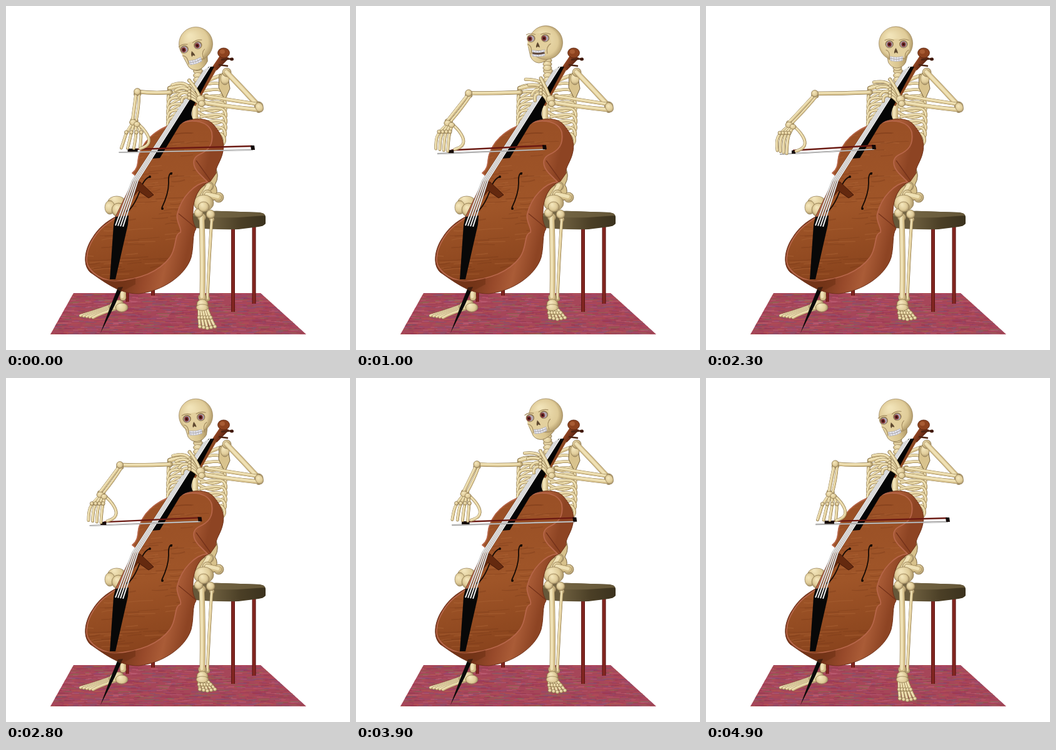
Animation of 550x550 px, one loop 5 s. Source, as an HTML page with a canvas:

```html
<!DOCTYPE html>
<html lang="en">
<head>
<meta charset="utf-8">
<title>Skeleton cellist</title>
<style>
html, body { margin: 0; height: 100%; overflow: hidden; background: #fff; }
canvas { display: block; width: 550px; height: 550px; }
</style>
</head>
<body>
<canvas id="stage" width="550" height="550"></canvas>
<script>
const stage = document.getElementById('stage').getContext('2d');
const backdrop = document.createElement('canvas');
backdrop.width = backdrop.height = 550;
let g = backdrop.getContext('2d');

let seed = 7;
const rnd = () => (seed = seed * 16807 % 2147483647) / 2147483647;
const lerp = (a, b, k) => a + (b - a) * k;

function shape(d, fill, line, w = 1) {
  const p = new Path2D(d);
  if (fill) { g.fillStyle = fill; g.fill(p); }
  if (line) { g.strokeStyle = line; g.lineWidth = w; g.stroke(p); }
  return p;
}
function oval(x, y, rx, ry, fill, line, turn = 0) {
  g.beginPath();
  g.ellipse(x, y, rx, ry, turn, 0, 7);
  g.fillStyle = fill;
  g.fill();
  if (line) { g.strokeStyle = line; g.lineWidth = .7; g.stroke(); }
}
function fade(x0, y0, x1, y1, ...cols) {
  const f = g.createLinearGradient(x0, y0, x1, y1);
  cols.forEach((c, i) => f.addColorStop(i / (cols.length - 1), c));
  return f;
}
function knob(x, y, r, ry = r, turn = 0) {
  const f = g.createRadialGradient(x - r * .3, y - r * .4, r * .1, x, y, Math.max(r, ry) * 1.1);
  f.addColorStop(0, '#f3e5bb');
  f.addColorStop(.6, '#dfcb98');
  f.addColorStop(1, '#98825a');
  oval(x, y, r, ry, f, '#8d774e', turn);
}
// Rounded bone through [x, y, x, y, ...], optionally with swollen ends
function bone(p, w, ends = 0) {
  const n = p.length;
  if (ends) { knob(p[0], p[1], ends); knob(p[n - 2], p[n - 1], ends); }
  g.lineCap = g.lineJoin = 'round';
  for (const [col, width, off] of [['#7c6740', w + .8, 0], ['#d6c08b', w, 0], ['#efe1b5', w * .55, -w * .14]]) {
    g.beginPath();
    g.moveTo(p[0] + off, p[1] + off);
    for (let i = 2; i < n - 2; i += 2) {
      const last = i === n - 4;
      const ex = last ? p[i + 2] : (p[i] + p[i + 2]) / 2;
      const ey = last ? p[i + 3] : (p[i + 1] + p[i + 3]) / 2;
      g.quadraticCurveTo(p[i] + off, p[i + 1] + off, ex + off, ey + off);
    }
    if (n === 4) g.lineTo(p[2] + off, p[3] + off);
    g.strokeStyle = col;
    g.lineWidth = width;
    g.stroke();
  }
  g.lineCap = 'butt';
}

function rug() {
  g.save();
  g.clip(shape('M108 459H407L480 525H71Z', '#a64659'));
  const dyes = ['#bb4c5c', '#8f3450', '#94467c', '#b55b48', '#76587c', '#c2657c', '#84704e', '#9c3450', '#a8485a'];
  for (let i = 0; i < 1500; i++) {
    const x = 55 + rnd() * 425, y = 459 + rnd() * 66;
    g.fillStyle = dyes[i % dyes.length];
    g.globalAlpha = .6;
    g.fillRect(x, y, 4 + rnd() * 18, .8 + rnd() * .6);
  }
  g.restore();
}

function chair() {
  const leg = (x, y0, y1, w = 6) => {
    g.fillStyle = fade(x - w / 2, 0, x + w / 2, 0, '#5d1713', '#8f2b25', '#5a1411');
    g.fillRect(x - w / 2, y0, w, y1 - y0);
  };
  leg(235, 430, 463);
  leg(194, 455, 473, 5);
  leg(396.5, 352, 476);
  leg(363, 354, 489);
  shape('M294 333Q315 327 345 328L405 330Q415 332 415 337V348Q412 352 404 353L372 357Q330 358 294 354Z',
    fade(294, 0, 415, 0, '#655739', '#6a5c3d', '#4b3f26', '#3b321e'));
  shape('M294 333Q315 327 345 328L405 330Q414 331 414 335L371 338Q330 339 294 336Z', fade(294, 328, 400, 340, '#796b49', '#665839'));
}

function torso() {
  for (let y = 104; y < 130; y += 7) knob(307, y, 7.5, 4.5);
  for (let y = 200; y < 320; y += 9) knob(322, y, 8, 5);
  for (let i = 0; i < 9; i++) {
    const y = 126 + i * 10, out = 346 + Math.sin(i / 3) * 4;
    bone([312, y + 1, out - 6, y - 6, out + 4, y + 8, out - 4, y + 20, 322, y + 24, 304, y + 12], 4);
    bone([290, y + 2, 265, y - 2, 257 - i * .3, y + 14, 262, y + 25], 4);
    bone([288, y + 10, 276, y + 12, 265, y + 20], 3);
  }
  bone([303, 128, 302, 180], 9);
  bone([262, 132, 280, 125, 304, 130], 6, 4);
  bone([310, 126, 330, 115, 352, 108], 5);
  shape('M341 110L354 108L358 132L350 150L340 130Z', '#d9c38d', '#75603b');
  knob(350, 116, 7, 10);
  // pelvis and knee
  shape('M333 256Q343 270 334 286Q341 295 333 310L302 320Q300 298 318 286Z', '#d7c18b', '#75603b');
  bone([325, 288, 312, 310], 10, 7);
  bone([322, 302, 340, 306], 9, 8);
  bone([329, 341, 325, 400, 322, 468], 4, 4);
  bone([313, 338, 315, 400, 314, 466], 8, 6.5);
  knob(316, 315, 16, 13);
  knob(308, 331, 7, 7);
  knob(327, 333, 7, 7);
  knob(316, 321, 9, 8);
  knob(314, 477, 9, 8);
  // far knee and foot
  knob(177, 313, 14, 9);
  knob(166, 322, 8, 11);
  knob(180, 326, 11, 11);
  bone([187, 440, 187, 466], 9, 5);
  for (let i = 0; i < 5; i++) bone([176, 476 + i * 2, 150, 486 + i * 1.4, 119 + i * 5, 495 + i * .8], 4);
  knob(176, 478, 12, 7, -.4);
  knob(185, 482, 10, 7);
}

function upperArm() {
  bone([353, 106, 378, 132, 404, 160], 8, 7);
  bone([403, 157, 362, 151, 320, 144], 5, 4);
  bone([404, 166, 360, 162, 315, 154], 6, 4.5);
  knob(405, 162, 6, 8, -.5);
}

function cello() {
  // scroll, pegs and neck
  shape('M328 100L343 78L357 83L337 103Z', fade(332, 85, 348, 95, '#a5522a', '#5a2310'));
  shape('M344 86L363 84M340 94L355 96', null, '#4c2412', 2.6);
  oval(348, 75, 9.5, 8, '#8c421e', '#51200d');
  oval(346, 73, 4, 3.5, '#a85c33');
  oval(361, 85, 3, 2.5, '#40180a');
  shape('M331 99L337 101L303 160L297 158Z', '#8d4822');
  // body
  shape('M278 187C300 178 322 178 332 190C344 204 350 217 347 232C344 249 334 258 336 267L327 280C308 288 299 308 299 330C297 343 301 350 304 356C297 366 301 382 296 402C287 431 250 456 212 460C181 461 153 438 135 426C121 413 127 387 138 371C148 354 162 344 175 337L203 280L208 272L202 267C214 258 209 245 214 235C222 210 250 190 278 187Z',
    fade(215, 330, 300, 350, '#7a3a1d', '#97492a', '#aa5c37', '#8d4423'), '#6d2f18');
  g.save();
  const face = shape('M278 188C300 179 324 185 329 202C332 222 324 231 308 238C297 244 298 256 308 267L322 281C302 283 280 306 274 332C270 342 282 356 279 362C268 365 274 386 262 402C240 431 202 438 174 440C146 438 127 419 129 403C130 381 147 358 162 348L176 338L203 282L208 272L202 267C214 258 209 245 214 235C222 210 250 190 278 188Z',
    fade(190, 220, 230, 430, '#9a5026', '#9f5528', '#8a441d'));
  g.clip(face);
  for (let i = 0; i < 170; i++) {
    const x = 115 + rnd() * 195, y = 182 + rnd() * 260, len = 15 + rnd() * 35;
    shape(`M${x} ${y}q${len / 2} ${-5 + rnd() * 8} ${len} ${-3 + rnd() * 2}`, null, i % 3 ? '#6f321444' : '#b56e3c55', 1 + rnd());
  }
  g.restore();
  g.strokeStyle = '#b7664a';
  g.lineWidth = 1.8;
  g.stroke(face);
  shape('M327 279L304 247M304 355L276 332', null, '#74321a', 1.3);
  // sound holes
  shape('M266 267Q259 266 260 283Q260 300 249 323', null, '#160b05', 1.8);
  shape('M231 273Q222 274 215 292Q207 318 193 330', null, '#160b05', 1.8);
  for (const [x, y] of [[264, 268], [250, 324], [230, 273], [194, 328]]) oval(x, y, 2, 2, '#160b05');
  // fingerboard, bridge, tailpiece and spike
  shape('M324 97L333 97L301 158Q293 172 299 181Q286 182 278 190L246 243L233 244L266 189Z', '#050505');
  shape('M208 282L214 281L236 302L228 307L211 295L202 307L198 303Z', '#64290f', '#3f1709');
  shape('M175 337L196 335L195 349L175 437L166 437L172 350Z', '#080808');
  shape('M179 450L187 449L174 478L151 523L167 480Z', '#0a0a0a');
  shape('M151 437L187 440L207 435L207 445L184 457Z', '#6e2f1388');
  for (let i = 0; i < 4; i++) {
    const string = `M${317 + i * 3} ${103 - i * 2}L${202 + i * 3} ${280 - i * .5}L${175 + i * 4} ${351 + i * .6}`;
    shape(string, null, '#858585', 2.3);
    shape(string, null, '#f4f4f4', 1.5);
  }
}

function skull(x, y, tilt, open) {
  for (let v = 87; v < 102; v += 6) knob(306, v, 7, 4.5);
  const f = g.createRadialGradient(294, 48, 3, 303, 60, 31);
  f.addColorStop(0, '#f1e3b8');
  f.addColorStop(.7, '#dfcb98');
  f.addColorStop(1, '#a08859');
  const yaw = (304 - x) / 14;
  g.save();
  g.translate(x, y);
  g.rotate(tilt);
  const jaw = 1.5 * open, back = 21 + yaw * 6;
  shape(`M-17 8L-13 29Q-9 ${37 + jaw} 0 ${38 + jaw}Q10 ${38 + jaw} ${back - 6} 29L${back} 6Z`, fade(-15, 0, back, 0, '#ead9a9', '#dac58f', '#a38a5b'), '#8d774e', .8);
  g.restore();
  oval(303.5, 60 + (y - 62) * .14, 27, 27, f, '#98825a');
  g.save();
  g.translate(x, y);
  g.rotate(tilt);
  shape('M-17 -5Q0 -12 20 -5L21 9L13 22H-11L-17 11Z', '#e3d09e');
  shape(`M-17 9Q-9 12 -12 25M20 9Q12 13 14 25M-19 -6Q-12 -10 -4 -6M4 -6Q12 -10 20 -6`, null, '#a58d60', 1.2);
  for (const side of [-11.3, 11.3]) {
    const iris = side - 2 * yaw;
    oval(side, 0, 6.4, 6, '#80694a', '#a08859');
    oval(side, .3, 5.2, 5, '#b3a8b4');
    oval(iris, .3, 3.5, 3.9, '#7d3030');
    oval(iris, .3, 1.7, 1.8, '#30100f');
  }
  shape('M-1 6Q-5 13 -3 15L-1 13L2 15Q3 13 -1 6Z', '#5f4930');
  const rows = open > .3 ? [19.5, 25 + open] : [20.5, 24];
  if (open > .3) oval(0, 24, 10, 4.5, '#5d4434');
  for (const row of rows) {
    shape(`M-10 ${row - 1}Q0 ${row + 2} 10 ${row - 1}V${row + 2}Q0 ${row + 5} -10 ${row + 2}Z`, '#ececf2', '#a5a5b4', .6);
    for (let i = -8; i <= 8; i += 4) shape(`M${i} ${row}v3.5`, null, '#a4a4b5', .6);
  }
  g.restore();
}

function foot(p) {
  for (let i = -2; i < 3; i++) {
    const x = 322 + i * 6, y = 498 + 17 * p - Math.abs(i) * 1.2;
    bone([315 + i * 3.2, 484, 318 + i * 4.6, lerp(487, 500, p), x, y], 4);
    knob(x, y, 3, 2.8);
    knob(318 + i * 4.6, lerp(489, 498, p), 3);
  }
  if (p < .12) {
    for (let i = 0; i < 3; i++) oval(316 + i * 5, 492, 3.5, 6, '#93784c', '#5f4829');
    oval(321, 500, 8, 3, '#6e5431');
  }
  knob(314, 482, 10, 5);
}

function leftHand(h) {
  for (let i = 0; i < 4; i++) {
    const tx = 266 + i * 5 + h * 6, ty = 126 + i * 9 - h * (i < 2 ? 10 : 2);
    bone([307, 148 + i * 2, 296 + h * 4, 131 + i * 5 - h * 9, 281 + h * 4, 121 + i * 8 - h * 4, tx, ty], 4.2);
    knob(293 + h * 3, 132 + i * 5 - h * 8, 3);
  }
  bone([310, 146, 304, 131, 293 + h * 3, 119 - h * 4], 4.5, 2.6);
  knob(311, 149, 7, 6);
  knob(313, 156, 5.5, 5);
}

function bowArm(tip) {
  const u = tip - 271, k = u / 126;
  const ex = 174 + .15 * u + .00108 * u * u, ey = 140 - 3 * k;
  const wx = 135 + .37 * u + .0015 * u * u, wy = 191 - 13 * k + 9 * k * k;
  const end = 118 + .32 * u + .0014 * u * u, frog = end + 25 + 5 * k;
  // elbow, forearm
  bone([262, 138, (ex + 262) / 2, 140, ex, ey], 5.5, 4.5);
  bone([ex - 2, ey + 4, wx - 3, wy - 4], 4.5, 3.6);
  bone([ex + 3, ey + 4, (ex + wx) / 2 + 5, (ey + wy) / 2, wx + 3, wy - 4], 3.5, 2.8);
  knob(ex, ey, 5.5);
  // bow
  const drop = 237 - 3 * k, tipY = 224 + k;
  shape(`M${end} ${drop}L${tip - 2} ${tipY + 5}`, null, '#808080', 2.2);
  shape(`M${end} ${drop}L${tip - 2} ${tipY + 5}`, null, '#ddd', 1.1);
  shape(`M${frog - 4} ${231 - 2 * k}L${tip - 3} ${tipY - 1}`, null, '#6b1912', 2.4);
  shape(`M${tip - 6} ${tipY - 2}h6l1 7h-6z`, '#120807');
  shape(`M${frog} ${drop - 6}h${-6 - 10 * k}v5h${6 + 10 * k}z`, '#160b08');
  // hand
  for (let i = 0; i < 4; i++) {
    const tx = wx + lerp(-21 + i * 5, -21 + i * 10, k), ty = wy + 40 + i * lerp(1.6, .3, k);
    const bx = wx + lerp(-17 + i * 5, -13 + i * 8, k), by = wy + lerp(12, 15, k);
    bone([wx - 4 + i * 3, wy + 2, bx, by, bx - lerp(6, 4, k) + i, by + 14, tx, ty], 4);
    knob(bx, by, 3);
  }
  bone([wx + 4, wy, wx + 14, wy + 8, wx + 25, wy + 26, wx + 20, wy + 38, wx + 9, wy + 41], 4);
  knob(wx - 2, wy - 1, 6, 4.5);
  knob(wx + 4, wy + 2, 5, 4);
}

// time, bow tip, face x, face y, face tilt, jaw, toe drop, finger lift
const poses = [
  [0, 397, 296, 66, -.3, 0, 1, 0],
  [500, 357, 290, 56, -.1, .8, .5, .5],
  [1400, 271, 294, 51, 0, .8, 0, 1],
  [2300, 271, 304.5, 61, 0, .1, .18, .4],
  [3400, 361, 293, 65, -.27, 0, .08, .1],
  [4400, 340, 288, 58, -.18, 0, .5, 1],
  [4900, 389, 295, 65, -.29, 0, 1, .15]
];
const pose = i => {
  const n = poses.length, row = poses[(i + n) % n].slice();
  row[0] += Math.floor(i / n) * 5000;
  return row;
};
// Smooth cyclic curve through the poses
function poseAt(t) {
  const i = poses.findLastIndex(r => r[0] <= t);
  const a = pose(i - 1), b = pose(i), c = pose(i + 1), d = pose(i + 2);
  const span = c[0] - b[0], k = (t - b[0]) / span;
  return b.map((v, j) => {
    const m = (c[j] - a[j]) / (c[0] - a[0]) * span, n = (d[j] - v) / (d[0] - b[0]) * span;
    return v + k * (m + k * (3 * (c[j] - v) - 2 * m - n + k * (m + n - 2 * (c[j] - v))));
  });
}

rug();
chair();
torso();
upperArm();
cello();
g = stage;

const start = performance.now();
function draw() {
  const t = Math.floor(Math.max(0, performance.now() - start) % 5000 / 100) * 100;
  const [, tip, x, y, tilt, jaw, toe, lift] = poseAt(t);
  g.fillStyle = '#fff';
  g.fillRect(0, 0, 550, 550);
  g.drawImage(backdrop, 0, 0);
  skull(x, y, tilt, Math.max(0, jaw));
  foot(Math.max(0, toe));
  leftHand(lift);
  bowArm(tip);
  requestAnimationFrame(draw);
}
draw();
</script>
</body>
</html>
```
